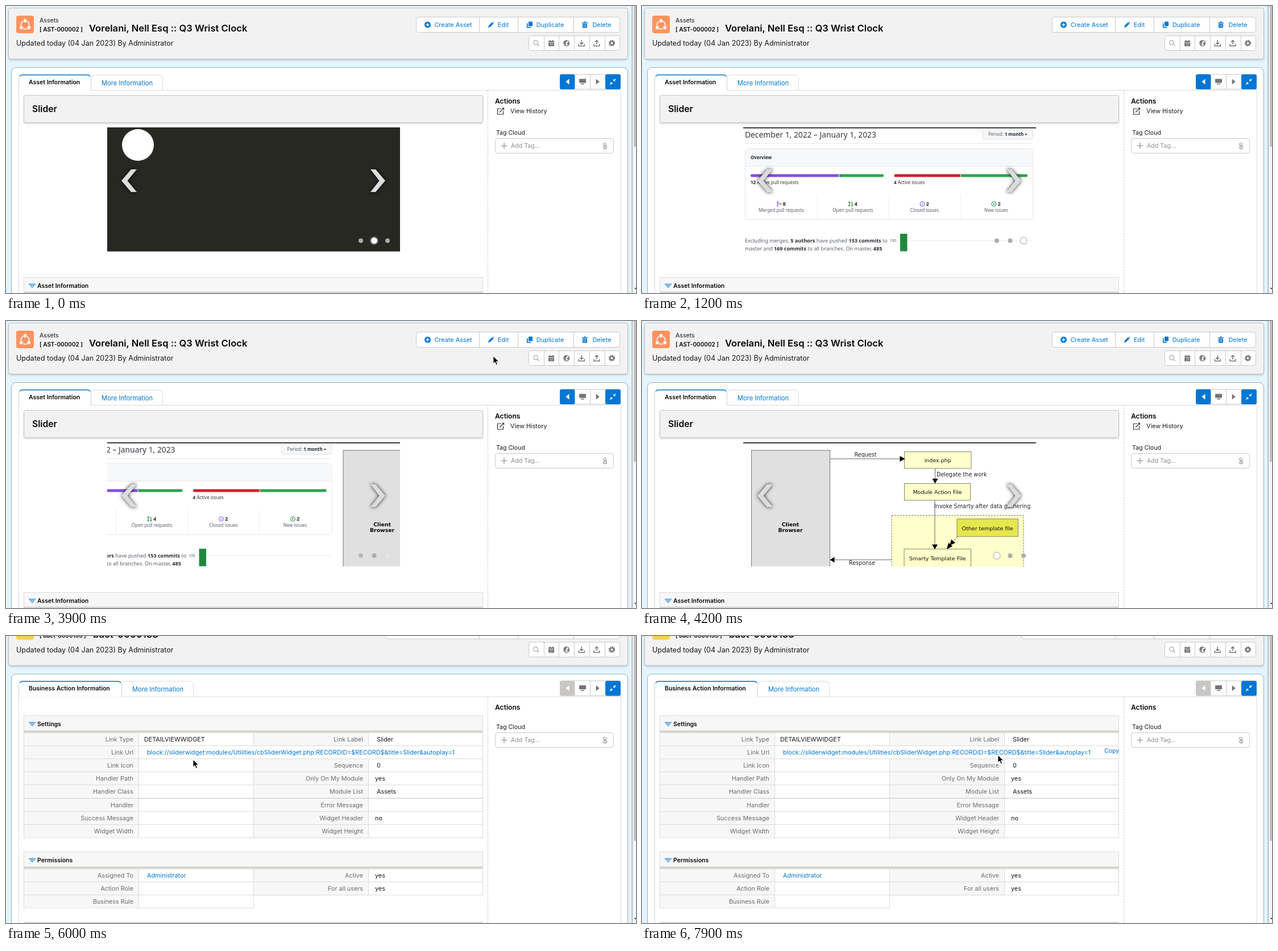
An HTML page for the animation above (8 s loop, 1108x506 px).

```html
<!DOCTYPE html>
<html lang="en">
<head>
<meta charset="utf-8">
<title>Slider widget</title>
<style>
html, body { margin: 0; width: 100%; height: 100%; overflow: hidden; }
svg { display: block; width: 100%; height: 100%; background: #e4f5fe; }
text { font-family: Inter, sans-serif; }
.noto text { font-family: "Noto Sans", sans-serif; }
.dia text { font-family: "DejaVu Sans", sans-serif; }
.shadow { filter: drop-shadow(0 2px 1.5px rgba(0, 0, 0, .15)); }
.arrows { filter: drop-shadow(0 0 3px rgba(0, 0, 0, .85)); }
.glow { filter: blur(1.2px); }
</style>
</head>
<body>
<svg id="stage" viewBox="0 0 1108 506"></svg>
<script>
const BLUE = '#0176d3', GREY = '#747474', LINE = '#d0d0d0', PALE = '#f3f2f2';

const text = (x, y, s, size, fill = '#181818', more = '') =>
  `<text x="${x}" y="${y}" font-size="${size}" fill="${fill}" ${more}>${s}</text>`;
const bold = (x, y, s, size, more = '') => text(x, y, s, size, '#080707', 'font-weight="600" ' + more);
const rect = (x, y, w, h, fill, stroke = 'none', r = 0, more = '') =>
  `<rect x="${x}" y="${y}" width="${w}" height="${h}" rx="${r}" fill="${fill}" stroke="${stroke}" ${more}/>`;
const line = (d, stroke = LINE, w = 1, more = '') =>
  `<path d="${d}" fill="none" stroke="${stroke}" stroke-width="${w}" ${more}/>`;
const shape = (d, fill) => `<path d="${d}" fill="${fill}"/>`;
const dot = (x, y, r, fill, stroke = 'none', w = 1, more = '') =>
  `<circle cx="${x}" cy="${y}" r="${r}" fill="${fill}" stroke="${stroke}" stroke-width="${w}" ${more}/>`;
const move = (x, y, s, more = '') => `<g transform="translate(${x} ${y})" ${more}>${s}</g>`;
const MID = 'text-anchor="middle"', END = 'text-anchor="end"';

// Icons are drawn around their own centre.
const icons = {
  plus: dot(0, 0, 5.5, BLUE) + line('M-3 0H3M0-3V3', '#fff', 1.6),
  pencil: shape('M-5 5L-4 1.5L2-4.5L4.5-2L-1.5 4ZM3-5.3L4-5.6L5.6-4L5.3-3Z', BLUE),
  copy: rect(-2, -5.5, 7, 8, BLUE, 'none', 1) + line('M-4.2-2.5V4.7H2', BLUE, 1.8),
  bin: line('M-5-3.2H5M-1.5-5H1.5', BLUE, 1.5) + shape('M-4-1.5H4V4.5Q4 5.5 3 5.5H-3Q-4 5.5-4 4.5Z', BLUE) +
    line('M-1.4 0V4M1.4 0V4', '#fff', .9),
  search: dot(-1, -1, 3.8, 'none', '#b4b4b4', 1.4) + line('M2 2L5 5', '#b4b4b4', 1.7),
  calendar: shape('M-5-4H5V-1.6H-5ZM-5-.8H5V5.5H-5Z', GREY) + line('M-2.5-5.5V-3M2.5-5.5V-3', GREY, 1.5) +
    text(0, 4.4, '31', 5, '#fff', MID),
  globe: dot(0, 0, 4.9, '#fff', GREY, 1.2) + shape('M-4.5-1L-3-4L0-4.5L1-2.5L-1.5-1L-.5 1L-2 4L-3.5 1.5ZM2-1.5L4.5-1L4 2L2.5 3.5L1 1Z', GREY),
  download: line('M-5 1.5V5H5V1.5', GREY, 1.5) + line('M0-5.5V2M-3-1L0 2L3-1', GREY, 1.5),
  upload: line('M-5 1.5V5H5V1.5', GREY, 1.5) + line('M0 2V-5M-3-2L0-5L3-2', GREY, 1.5),
  gear: dot(0, 0, 4.7, 'none', GREY, 2, 'stroke-dasharray="2.2 1.49"') + dot(0, 0, 3, '#fff', GREY, 2),
  left: shape('M3-5V5L-3 0Z', '#fff'),
  screen: rect(-6, -5, 12, 7, GREY, 'none', 1) + rect(-3, 3.2, 6, 1.6, GREY),
  right: shape('M-3-5V5L3 0Z', GREY),
  compress: shape('M1-1V-5L2.5-3.5L4.5-5.5L5.5-4.5L3.5-2.5L5-1ZM-1 1V5L-2.5 3.5L-4.5 5.5L-5.5 4.5L-3.5 2.5L-5 1Z', '#fff'),
  open: line('M1-4H-5.5V6H4.5V0', '#333', 1.2) + line('M-2 2.5L5-4.5M2-5H5.5V-1.5', '#333', 1.2),
  touch: dot(0, -2.5, 2.6, 'none', '#999', 1) + line('M0-2.5V3M-3 1.5L-1 5H2.5L3.5 1L0 0', '#999', 1.3),
  fold: '<path d="M-6-3.5H6L0 3.5Z" fill="#7fc4ee" stroke="#4a90c4" stroke-width=".8"/>',
  merge: dot(-2.5, -3, 1.1, 'none', '#8250df') + dot(-2.5, 3, 1.1, 'none', '#8250df') + dot(3, 0, 1.1, 'none', '#8250df') +
    line('M-2.5-2V2M-2-2Q-1 0 2 0', '#8250df'),
  pull: dot(-2.5, -3, 1.1, 'none', '#1a7f37') + dot(-2.5, 3, 1.1, 'none', '#1a7f37') + dot(2.5, 3, 1.1, 'none', '#1a7f37') +
    line('M-2.5-2V2M0-3H2.5V2', '#1a7f37'),
  closed: dot(0, 0, 4, 'none', '#8250df') + line('M-1.8 0L-.4 1.4L2-1.2', '#8250df'),
  fresh: dot(0, 0, 4, 'none', '#1a7f37') + dot(0, 0, 1.2, '#1a7f37')
};
const icon = (name, x, y) => move(x, y, icons[name]);

// Page frame shared by both records; tabs are [label, right edge, text x].
function page(dy, o) {
  const [first, second] = o.tabs;
  const buttons = [['plus', 741.5, 786.5, 'Create Asset'], ['pencil', 853, 874.5, 'Edit'],
    ['copy', 921, 957, 'Duplicate'], ['bin', 1018, 1048, 'Delete']];
  const tools = ['search', 'calendar', 'globe', 'download', 'upload', 'gear'];
  const a = first[1] + .5, b = second[1] + .5;
  return move(0, dy,
    rect(4.5, 3.5, 1089, 90, PALE, '#b4bdc4', 4, 'class="shadow"') +
    rect(18, 17, 31, 31, o.color, 'none', 4) + dot(33.5, 33.5, 7.3, 'none', '#fff', 1.8) +
    [[33.5, 26], [26.8, 38], [40.2, 38]].map(([x, y]) => dot(x, y, 3.4, '#fff', o.color, 1)).join('') +
    text(59, 28.5, o.module, 10.6) + bold(59, 44.5, `[ ${o.code} ]`, 10) + bold(o.titleX, 44.5, o.title, 16.6) +
    text(18, 70, 'Updated today (04 Jan 2023) By Administrator', 12.5) +
    rect(o.buttonX + .5, 19.5, 1079 - o.buttonX, 27, '#fff', '#c9c9c9', 4) +
    line('M832.5 19V47M900.5 19V47M998.5 19V47', '#c9c9c9') +
    buttons.map(([i, x, cx, s]) => icon(i, x, 33) + text(cx, 37, s, 10.9, BLUE, MID)).join('') +
    rect(919.5, 52.5, 160, 26, '#fff', '#c9c9c9', 3) +
    line('M946.5 52V79M972.5 52V79M999.5 52V79M1026.5 52V79M1053.5 52V79', '#c9c9c9') +
    tools.map((n, i) => icon(n, 932.5 + i * 26.6, 65.5)).join('') +
    rect(9.5, 108.5, 1084, 600, '#fff', '#97adba', 8) +
    line('M22.5 600V148.5H1081.5V600', '#dddbda') +
    line(`M${a} 148V129Q${a} 121.5 ${a + 8} 121.5H${b - 8}Q${b} 121.5 ${b} 129V148`, '#d3dce4') +
    `<path d="M22.5 149V128Q22.5 121.5 29 121.5H${a - 7}Q${a} 121.5 ${a} 128V149" fill="#fff" stroke="#d0d0d0"/>` +
    line(`M24 124Q26 121.5 29 121.5H${a - 7}Q${a - 3} 121.5 ${a - 1.5} 124`, '#3a8fd0', 1.8) +
    bold(40, 137.5, first[0], 10.5) + text(second[2], 139.5, second[0], 11.1, BLUE) +
    rect(974.5, 120.5, 106, 26, '#fff', '#c9c9c9', 3) + line('M1027.5 120V147', '#c9c9c9') +
    rect(974, 120.5, 26.5, 26.5, o.back, 'none', 3) + rect(1054, 120.5, 27, 26.5, BLUE, 'none', 3) +
    ['left', 'screen', 'right', 'compress'].map((n, i) => icon(n, 987.5 + i * 26.6, 133.5)).join('') +
    line('M847.5 149V600', '#c4c4c4', 1, 'stroke-dasharray="2.5 2"') +
    bold(860, 171.5, 'Actions', 12.1)) +
    move(0, o.tagY, text(862, 0, 'Tag Cloud', 10.6) + rect(860.5, 6.5, 208, 26, '#fff', '#c9c9c9', 4) +
      line('M870.5 19.5H881.5M876 14V25', '#8c8c8c', 1.2) + text(888, 23, 'Add Tag...', 10.6, '#8c8c8c') + icon('touch', 1053, 19.5)) +
    rect(1100.5, 0, 1.5, 506, '#9fb0ba') + rect(1102, 0, 6, 506, '#f4f6f7') + rect(1104, 0, 4, o.thumb, '#c1c1c1') +
    shape('M1104.5 497H1108V500Z', '#444');
}

const heading = (y, s, h = 29) => rect(31.5, y + .5, 807, h, '#f7f7f7', '#dddbda') + icon('fold', 46, y + 15.5) + bold(55, y + 18.8, s, 10.5);

// Slides are drawn at their resting place on the stage.
const WIDTH = 515;
const topRule = rect(178, 213.8, WIDTH, 1.8, '#111');
const logoSlide = rect(178, 214, WIDTH, 219, '#272822') + dot(232, 245, 28, '#fff');

const strong = s => `<tspan font-weight="700" fill="#24292f">${s}</tspan>`;
const INK = '#57606a';
const stat = (cx, i, n, label) => icon(i, cx - 4, 349) + text(cx + 2.5, 351.8, strong(n), 9.3) + text(cx, 363, label, 8, INK, MID);
const pulseSlide = rect(178, 214, WIDTH, 219, '#fff') + topRule +
  text(181, 232, 'December 1, 2022 – January 1, 2023', 13.8, '#32383e') +
  rect(599.5, 218, 87.5, 17, '#f6f8fa', '#dfe2e5', 3) + text(609, 229.3, 'Period: ' + strong('1 month'), 8, INK) +
  shape('M673 225.5H678L675.5 228Z', '#333') + line('M181 242.5H687', '#e6e8ea') +
  rect(181.5, 251.5, 506, 125, '#fff', '#e4e7ea', 4) + rect(182, 252, 505, 30, '#f6f8fa', 'none', 4) + line('M182 282.5H687', '#e4e7ea') +
  text(191, 270, strong('Overview'), 7.9) +
  rect(191, 296.5, 160, 5, '#8250df', 'none', 2) + rect(347, 296.5, 78, 5, '#2da44e', 'none', 2) +
  rect(443.5, 296.5, 120, 5, '#cf222e', 'none', 2) + rect(561, 296.5, 117, 5, '#2da44e', 'none', 2) +
  rect(346, 296.5, 1, 5, '#fff') + rect(560, 296.5, 1, 5, '#fff') +
  text(191, 314.3, strong('12') + ' Active pull requests', 8, '#32383e') + text(443, 314.3, strong('4') + ' Active issues', 8, '#32383e') +
  line('M308 333V376M434 333V376M560 333V376', '#eceef0') +
  stat(245, 'merge', 8, 'Merged pull requests') + stat(371, 'pull', 4, 'Open pull requests') +
  stat(497, 'closed', 2, 'Closed issues') + stat(623, 'fresh', 2, 'New issues') +
  text(181, 417.3, `Excluding merges, ${strong('5 authors')} have pushed ${strong('153 commits')} to`, 9.05, INK) +
  text(181, 431, `master and ${strong('169 commits')} to all branches. On master, ${strong('485')}`, 9.05, INK) +
  text(435.5, 416, '100', 6.8, INK) + line('M468 413.5H687', '#eeeeee') + rect(454, 401.5, 12.5, 31, '#1f883d');

const box = (x, y, w, h, s, base, fill = '#ffffcc') => rect(x, y, w, h, fill, '#85856a') + text(x + w / 2, base, s, 9.5, '#111', MID);
const RULE = '#666', HEAVY = 'font-weight="700" ' + MID;
const flowSlide = rect(178, 214, WIDTH, 219, '#fff') + topRule +
  rect(192.5, 228, 138, 210, '#e0e0e0', '#777') +
  text(261, 361.5, 'Client', 9.3, '#080707', HEAVY) + text(261, 372, 'Browser', 9.3, '#080707', HEAVY) +
  rect(439, 342.5, 232, 100, '#ffffcc', '#77775c', 0, 'stroke-dasharray="3 2"') +
  line('M331 243H455M515.5 260V280M515 316V396M338 421H439', RULE) +
  box(461.5, 230.5, 117.5, 29.5, 'index.php', 249) + box(461.5, 286.5, 116, 29.5, 'Module Action File', 305) +
  box(554, 349, 107.5, 31, 'Other template file', 368.5, '#e6e64d') + box(461, 402, 117.5, 40, 'Smarty Template File', 422) +
  line('M555 380L541 396', '#333', 1, 'stroke-dasharray="3 2"') +
  shape('M453.5 238V248L462.5 243ZM510.5 278H520.5L515.5 286.5ZM510 394H520L515 402.5ZM338.5 416V426L330.5 421Z' +
    'M536 402.5L539 391L546 397ZM541 396L544 385L551 391Z', '#000') +
  text(393, 239, 'Request', 9.6, '#222', MID) + text(387, 430, 'Response', 9.6, '#222', MID) +
  text(518, 273.5, 'Delegate the work', 9.6, '#222') + text(514, 329.8, 'Invoke Smarty after data gathering', 9.6, '#222');

const dotX = [624, 647.5, 671];
const assetScene = page(0, {
  color: '#fe9360', module: 'Assets', code: 'AST-000002', titleX: 146, title: 'Vorelani, Nell Esq :: Q3 Wrist Clock',
  buttonX: 721, tabs: [['Asset Information', 149], ['More Information', 275, 168]], back: BLUE, tagY: 227, thumb: 248 }) +
  icon('open', 870, 185) + text(887, 188.5, 'View History', 10.8) +
  rect(31.5, 157.5, 807, 48, PALE, '#c4c4c4', 3, 'class="shadow"') + bold(46, 187, 'Slider', 15.7) +
  '<clipPath id="window"><rect x="178" y="213.8" width="515" height="219"/></clipPath>' +
  `<g clip-path="url(#window)"><g id="strip">${logoSlide}${move(WIDTH, 0, pulseSlide, 'class="noto"')}${move(2 * WIDTH, 0, flowSlide, 'class="dia"')}</g></g>` +
  '<g class="arrows">' + shape('M203 308L220 288H230L213.5 308L230 328H220ZM667 308L650 288H641L656.5 308L641 328H650Z', '#dcdcdc') + '</g>' +
  dotX.map(x => `<g class="dot"><circle class="glow" cx="${x}" cy="413.7" r="6.5" fill="#bbb"/>${dot(x, 413.7, 4, '#acacac')}</g>`).join('') +
  heading(478, 'Asset Information', 40) + rect(31, 503.5, 808, 3, '#d8d6d0');

// Rows are [label, value, value x, label, value, value x].
const ROW = 23.2;
function table(y, title, rows) {
  const band = rect(32, y + 26.5, 807, 3, '#d6d3ca');
  return heading(y, title) + band + rows.map(([l1, v1, x1, l2, v2, x2], i) => {
    const top = Math.floor(y + 30 + i * ROW) + .5, base = top + 15.2;
    const right = l1 === 'Business Rule' ? 435.5 : 838.5;
    return rect(31.5, top, right - 31.5, ROW, '#fff', '#dddbda') + rect(32, top + .5, 201.5, ROW - 1, '#f7f7f7') +
      line(`M233.5 ${top}v${ROW}`, '#dddbda') + text(224, base, l1, 10.8, '#6b6b6b', END) +
      text(x1, base, v1, 10.8, x1 === 248 ? BLUE : '#181818') +
      (l2 ? rect(435.5, top, 202, ROW, '#f7f7f7', '#dddbda') + text(628, base, l2, 10.8, '#6b6b6b', END) + text(x2, base, v2, 10.8) : '');
  }).join('');
}
const actionScene = page(-41.5, {
  color: '#f5cf57', module: '', code: 'bact-0000133', titleX: 153, title: 'bact-0000133',
  buttonX: 667, tabs: [['Business Action Information', 203], ['More Information', 329, 222]], back: '#c9c7c5', tagY: 164, thumb: 361 }) +
  table(140, 'Settings', [
    ['Link Type', 'DETAILVIEWWIDGET', 243, 'Link Label', 'Slider', 652],
    ['Link Url', 'block://sliderwidget:modules/Utilities/cbSliderWidget.php:RECORDID=$RECORD$&amp;title=Slider&amp;autoplay=1', 248],
    ['Link Icon', '', 0, 'Sequence', '0', 652],
    ['Handler Path', '', 0, 'Only On My Module', 'yes', 649],
    ['Handler Class', '', 0, 'Module List', 'Assets', 652],
    ['Handler', '', 0, 'Error Message', '', 0],
    ['Success Message', '', 0, 'Widget Header', 'no', 649],
    ['Widget Width', '', 0, 'Widget Height', '', 0]]) +
  table(380, 'Permissions', [
    ['Assigned To', 'Administrator', 248, 'Active', 'yes', 649],
    ['Action Role', '', 0, 'For all users', 'yes', 649],
    ['Business Rule', '', 0]]) +
  rect(31, 504, 808, 2, '#dddbda') + `<g id="copy">${text(813, 206, 'Copy', 10.6, BLUE)}</g>`;

const stage = document.getElementById('stage');
stage.innerHTML = `<g id="asset">${assetScene}</g><g id="action">${actionScene}</g>` +
  '<path id="cursor" d="M0 0V13L3 10.3L5.2 15.3L7.4 14.3L5.2 9.5H9.5Z" fill="#000" stroke="#fff" stroke-width=".8"/>';
const [asset, action, strip, copy, cursor] =
  ['asset', 'action', 'strip', 'copy', 'cursor'].map(id => document.getElementById(id));
const dots = [...document.querySelectorAll('.dot')];

// Pointer trips as [time, x, y]; each ends when its last time has passed.
const trips = [
  [[2700, 613, 343], [3200, 862, 81], [3800, 862, 81], [3900, 857, 62], [4100, 877, 6]],
  [[5700, 420, 0], [6000, 329, 218], [6200, 290, 403], [6400, 254, 212], [6600, 254, 212], [7500, 475, 212], [7900, 626, 210]]
];
const clamp = v => Math.min(1, Math.max(0, v));
const swing = v => .5 - .5 * Math.cos(Math.PI * clamp(v));

function pointerAt(t) {
  const trip = trips.find(p => t >= p[0][0] && t < p[p.length - 1][0] + 100);
  if (!trip) return null;
  const i = Math.max(1, trip.findIndex(k => k[0] >= t));
  const [t0, x0, y0] = trip[i - 1], [t1, x1, y1] = trip[i], k = (t - t0) / (t1 - t0);
  return [x0 + (x1 - x0) * k, y0 + (y1 - y0) * k];
}
const show = (el, on) => el.setAttribute('visibility', on ? 'visible' : 'hidden');

function draw(now) {
  const t = Math.floor(now % 8000 / 100) * 100;
  asset.style.display = t < 5100 ? '' : 'none';
  action.style.display = t < 5100 ? 'none' : '';

  const pos = swing((t - 775) / 400) + swing((t - 3775) / 400);
  strip.setAttribute('transform', `translate(${-WIDTH * pos} 0)`);
  dots.forEach((el, i) => {
    const d = (i - pos + 2) % 3, active = clamp(1 - Math.min(d, 3 - d));
    const shade = 172 + 83 * active ** 1.5, [glow, core] = el.children;
    glow.setAttribute('opacity', active ** 8);
    core.setAttribute('r', 4 + active ** 4);
    core.setAttribute('fill', `rgb(${shade},${shade},${shade})`);
  });

  const p = pointerAt(t);
  show(cursor, p);
  if (p) cursor.setAttribute('transform', `translate(${p[0]} ${p[1]})`);
  show(copy, t >= 6400);
}
const start = performance.now();
function loop() {
  draw(performance.now() - start);
  requestAnimationFrame(loop);
}
loop();
</script>
</body>
</html>
```
